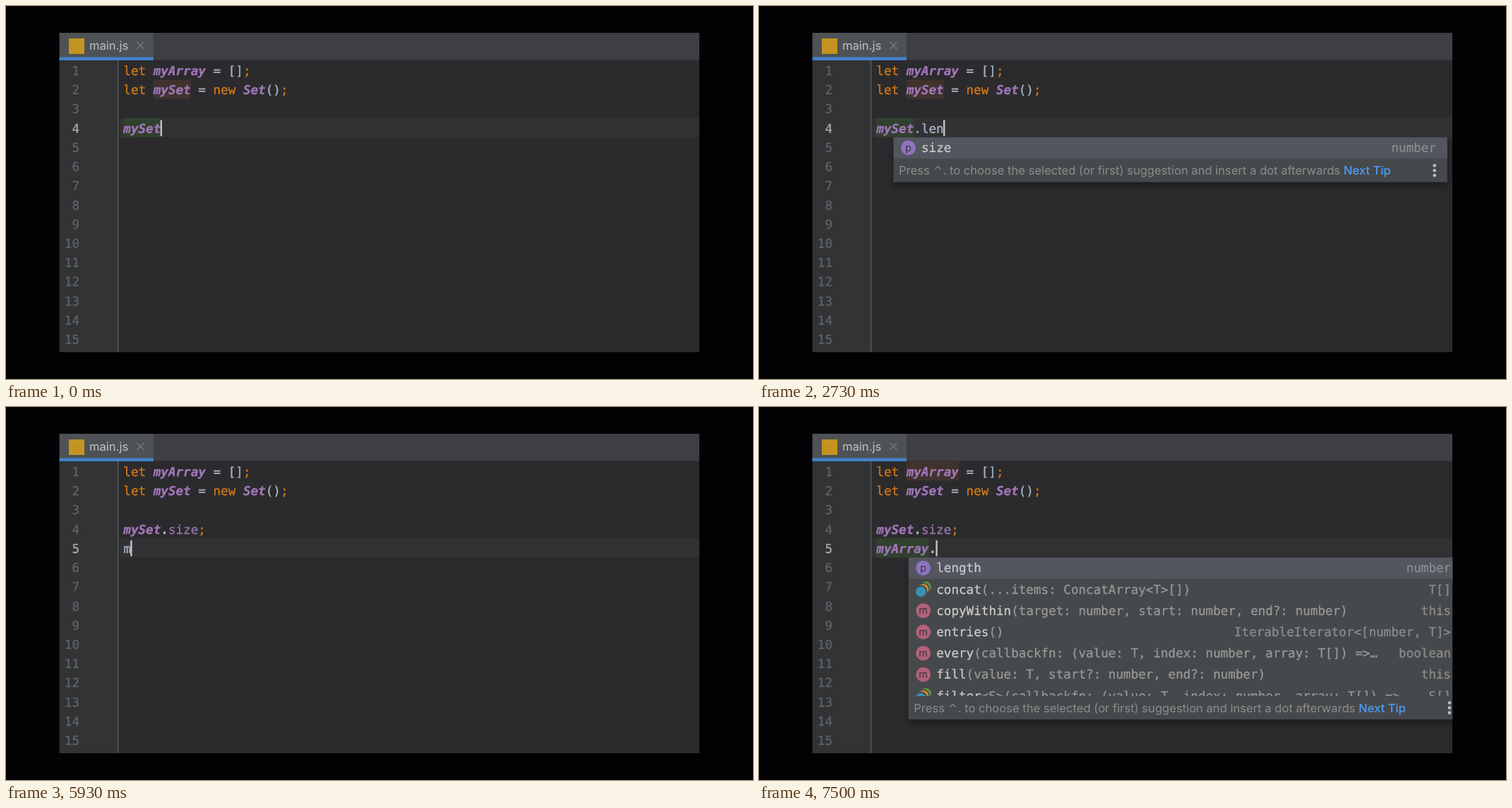
These frames come from a looping animation (1058x529 px, 8000 ms). An HTML page with a canvas:

```html
<!DOCTYPE html>
<html lang="en">
<head>
<meta charset="utf-8">
<title>Code completion</title>
<style>
  html, body { margin: 0; width: 100%; height: 100%; overflow: hidden; background: #020204; }
  canvas { display: block; width: 1058px; height: 529px; }
</style>
</head>
<body>
<canvas id="stage"></canvas>
<script>
const canvas = document.getElementById('stage');
const ctx = canvas.getContext('2d');
const LOOP = 8000;
const LEFT = 75.5, TOP = 38, WIDTH = 906.7, HEIGHT = 453;
const CODE_X = 166.3, CODE_TOP = 77.3, LINE = 27.22, ADVANCE = 10.6;
const ROW = 30.2, FOOTER = 33.4, POPUP_WIDTH = 784.3;
const MONO = '17.607px "DejaVu Sans Mono", monospace';
const UI = '16.6px Inter, sans-serif';

const COLORS = {
  keyword: '#d67a14', variable: '#a276ba', property: '#9d75b0', plain: '#a9b7c6', dot: '#a9b7c6',
  name: '#cacaca', details: '#989898', dim: '#8c8c8c', match: '#4c9dfa', read: '#32412f', write: '#40332d',
};
const STYLES = { variable: 'italic bold ', dot: 'bold ' };
const ICONS = {
  p: ['p', '#9073bf'], v: ['v', '#9073bf'], m: ['m', '#b4607a'], c: ['c', '#3a8fae'], inherited: ['m', '#909090'],
};

// Code lines as [style, text] tokens
const arrayLine = [['keyword', 'let '], ['variable', 'myArray'], ['plain', ' = []'], ['keyword', ';']];
const setLine = [['keyword', 'let '], ['variable', 'mySet'], ['plain', ' = '], ['keyword', 'new '],
  ['variable', 'Set'], ['plain', '()'], ['keyword', ';']];
const setRef = ['variable', 'mySet'], arrayRef = ['variable', 'myArray'];
const member = text => [setRef, ['plain', '.' + text]];
const sizeRef = [setRef, ['dot', '.'], ['property', 'size']];
const sizeLine = [...sizeRef, ['keyword', ';']];

// Suggestions as [icon, name, details, type]
const size = ['p', 'size', '', 'number'];
const clear = ['m', 'clear', '()', 'void'];
const remove = ['m', 'delete', '(value: T)', 'boolean'];
const enumerable = ['inherited', 'propertyIsEnumerable', '(v: PropertyKey) (Object, built-in)', 'boolean'];
const localeString = ['inherited', 'toLocaleString', '() (Object, built-in)', 'string'];
const letTemplate = ['', 'let', '', 'let name = expr'];
const setMembers = [
  size, ['m', 'add', '(value: T)', 'this'], clear, remove,
  ['m', 'entries', '()', 'IterableIterator<[T, T]>'],
  ['m', 'forEach', '(callbackfn: (value: T, value2: T, set: Set<T>) =>…', 'void'],
  ['m', 'has', '(value: T)', 'boolean'],
];
const arrayMembers = [
  ['p', 'length', '', 'number'],
  ['overload', 'concat', '(...items: ConcatArray<T>[])', 'T[]'],
  ['m', 'copyWithin', '(target: number, start: number, end?: number)', 'this'],
  ['m', 'entries', '()', 'IterableIterator<[number, T]>'],
  ['m', 'every', '(callbackfn: (value: T, index: number, array: T[]) =>…', 'boolean'],
  ['m', 'fill', '(value: T, start?: number, end?: number)', 'this'],
  ['overload', 'filter', '<S>(callbackfn: (value: T, index: number, array: T[]) =>…', 'S[]'],
];
const globals = [
  ['v', 'myArray', '', 'any[]'], ['v', 'mySet', '', 'Set<any>'],
  ...['MimeType', 'MimeTypeArray', 'MediaKeys', 'MediaKeySession', 'MediaKeyStatusMap']
    .map(name => ['c', name, ' (built-in)', '']),
];
const popup = (column, prefix, rows) => ({ column, prefix, rows });
const setMarks = [[2, 4, 5, 'write'], [4, 0, 5, 'read']];

// Each step changes part of the editor state
const steps = [
  [0, { line: 4, text: [setRef], marks: setMarks, popup: null, bulb: false }],
  [60, { text: member('') }],
  [130, { popup: popup(6, '', setMembers) }],
  [1400, { text: member('l') }],
  [1430, { popup: popup(6, 'l', [size, clear, remove, ['m', 'values', '()', 'IterableIterator<T>'],
    enumerable, localeString, letTemplate]) }],
  [1530, { text: member('le'), popup: popup(6, 'le', [size, clear, remove, enumerable, localeString, letTemplate]) }],
  [2730, { text: member('len'), popup: popup(6, 'len', [size]) }],
  [2860, { text: member('leng'), popup: popup(6, 'leng', [size]) }],
  [3430, { popup: null }],
  [3460, { text: sizeRef }],
  [3730, { marks: [[4, 6, 4, 'read']] }],
  [4260, { bulb: true }],
  [4930, { text: sizeLine, bulb: false }],
  [4960, { marks: [] }],
  [5230, { line: 5, text: [] }],
  [5930, { text: [['plain', 'm']] }],
  [6000, { popup: popup(0, 'm', globals) }],
  [6030, { text: [['plain', 'my']] }],
  [6100, { popup: popup(0, 'my', globals) }],
  [6730, { popup: null }],
  [6760, { text: [arrayRef] }],
  [7030, { marks: [[1, 4, 7, 'write'], [5, 0, 7, 'read']] }],
  [7430, { text: [arrayRef, ['dot', '.']] }],
  [7500, { popup: popup(8, '', arrayMembers) }],
];

function rect(x, y, width, height, color) {
  ctx.fillStyle = color;
  ctx.fillRect(x, y, width, height);
}

function disc(x, y, radius, color) {
  ctx.fillStyle = color;
  ctx.beginPath();
  ctx.arc(x, y, radius, 0, 2 * Math.PI);
  ctx.fill();
}

function strokeLine(x1, y1, x2, y2, color, width) {
  ctx.strokeStyle = color;
  ctx.lineWidth = width;
  ctx.beginPath();
  ctx.moveTo(x1, y1);
  ctx.lineTo(x2, y2);
  ctx.stroke();
}

function label(text, x, y, color, font = UI, align = 'left') {
  ctx.font = font;
  ctx.textAlign = align;
  ctx.fillStyle = color;
  ctx.fillText(text, x, y);
}

// Monospaced text with a hairline outline for a slightly heavier weight
function code(text, x, y, color, style = '', align = 'left') {
  label(text, x, y, color, style + MONO, align);
  ctx.strokeStyle = color;
  ctx.lineWidth = 0.3;
  ctx.strokeText(text, x, y);
}

const lineTop = line => CODE_TOP + (line - 1) * LINE;

function drawCode(line, tokens) {
  let column = 0;
  for (const [style, text] of tokens) {
    code(text, CODE_X + column * ADVANCE, lineTop(line) + 20.7, COLORS[style], STYLES[style]);
    column += text.length;
  }
  return column;
}

function drawTab() {
  rect(LEFT, TOP, WIDTH, 39, '#3e3e43');
  rect(LEFT, 76, WIDTH, 1, '#353538');
  rect(LEFT, TOP, 133.3, 39, '#4e5254');
  rect(LEFT, 72.5, 133.3, 4.5, '#4283cc');
  rect(89, 46, 22, 22, '#c49421');
  label('main.js', 118, 62, '#c0c2c4');
  strokeLine(185.3, 51, 195.3, 61, '#777b7d', 1.2);
  strokeLine(195.3, 51, 185.3, 61, '#777b7d', 1.2);
}

function drawBulb() {
  disc(187.5, 144, 7.8, '#f4a90c');
  rect(184, 149, 7, 3.5, '#f4a90c');
  rect(183.2, 153, 8.6, 1.4, '#b8bcc0');
  rect(184.2, 155.7, 6.6, 1.3, '#b8bcc0');
}

function drawEditor(state) {
  rect(LEFT, 77, WIDTH, 414, '#2b2b2d');
  rect(LEFT, 77, 82.5, 414, '#313335');
  rect(160, lineTop(state.line), 822, LINE, '#323234');
  rect(158, 77, 1.2, 414, '#606060');
  for (let line = 1; line <= 15; line++) {
    code(line, 104, lineTop(line) + 20.7, line === state.line ? '#a9a9a9' : '#606366', '', 'right');
  }
  for (const [line, column, length, kind] of state.marks) {
    rect(CODE_X + column * ADVANCE, lineTop(line), length * ADVANCE, LINE, COLORS[kind]);
  }
  drawCode(1, arrayLine);
  drawCode(2, setLine);
  if (state.line === 5) drawCode(4, sizeLine);
  const column = drawCode(state.line, state.text);
  rect(CODE_X + column * ADVANCE - 0.7, lineTop(state.line) + 3, 2.4, 22.5, '#c4c4c4');
  if (state.bulb) drawBulb();
}

// Indices of the letters that match what was typed
function matchedLetters(name, prefix) {
  const lower = name.toLowerCase(), start = lower.indexOf(prefix);
  if (start >= 0) return [...prefix].map((_, i) => start + i);
  const found = [];
  for (const letter of prefix) {
    const index = lower.indexOf(letter, found.length ? found[found.length - 1] + 1 : 0);
    if (index < 0) return [];
    found.push(index);
  }
  return found;
}

function drawIcon(kind, x, y) {
  if (kind === 'overload') {
    disc(x + 3.5, y - 3.5, 7.5, '#5a9a3c');
    disc(x + 0.3, y - 0.8, 8.6, '#46494b');
    disc(x, y - 0.2, 7.5, '#d3902f');
    disc(x - 3, y + 2.6, 8.6, '#46494b');
    disc(x - 3.5, y + 3.3, 7.2, '#3a91b4');
  } else if (kind) {
    const [letter, color] = ICONS[kind];
    disc(x, y, 10.4, color);
    label(letter, x, y + 4.6, '#35363a', '14.5px Inter, sans-serif', 'center');
  }
}

function drawRow([icon, name, details, type], prefix, left, top) {
  const x = left + 39.5, baseline = top + 20.9;
  const matches = icon ? matchedLetters(name, prefix) : [];
  const base = icon === 'inherited' ? 'dim' : 'name';
  drawIcon(icon, left + 21, top + 15);
  [...name].forEach((letter, i) =>
    code(letter, x + i * ADVANCE, baseline, COLORS[matches.includes(i) ? 'match' : base]));
  code(details, x + name.length * ADVANCE, baseline, icon === 'inherited' ? COLORS.dim : COLORS.details);
  code(type, left + POPUP_WIDTH - 15.8, baseline, COLORS.dim, '', 'right');
}

function drawFooter(left, bottom) {
  const baseline = bottom - 10.5;
  label('Press', left + 7.5, baseline, COLORS.dim);
  label('^', left + 56, baseline, COLORS.dim, '16px "DejaVu Sans", sans-serif');
  label('. to choose the selected (or first) suggestion and insert a dot afterwards',
    left + 70, baseline, COLORS.dim);
  label('Next Tip', left + 637.5, baseline, COLORS.match, '500 ' + UI);
  for (const offset of [-7, 0, 7]) disc(left + 766.3, bottom - 16.5 + offset, 2.3, '#bcbec0');
}

function drawPopup({ column, prefix, rows }, line, age) {
  const left = CODE_X + column * ADVANCE - 39.4, top = lineTop(line + 1);
  const listHeight = Math.min(rows.length, 6.5) * ROW, bottom = top + listHeight + FOOTER;

  ctx.save();
  ctx.shadowColor = 'rgba(0,0,0,.35)';
  ctx.shadowBlur = 10 * scale;
  ctx.shadowOffsetY = 5 * scale;
  rect(left, top, POPUP_WIDTH, bottom - top, '#46494b');
  ctx.restore();

  ctx.save();
  ctx.beginPath();
  ctx.rect(left, top, POPUP_WIDTH, listHeight);
  ctx.clip();
  rect(left, top, POPUP_WIDTH, ROW, '#53565f');
  rows.forEach((row, i) => drawRow(row, prefix, left, top + i * ROW));
  if (rows.length > 6) {
    ctx.globalAlpha = Math.max(0, Math.min(1, (1100 - age) / 130));
    ctx.beginPath();
    ctx.roundRect(left + 770, top + 2, 11, 38, 5.5);
    ctx.fillStyle = 'rgba(166,166,166,.4)';
    ctx.fill();
  }
  ctx.restore();
  drawFooter(left, bottom);
}

function draw(time) {
  const state = {};
  let popupStart = 0;
  for (const [at, change] of steps) {
    if (at > time) break;
    Object.assign(state, change);
    if (change.popup) popupStart = at;
  }
  ctx.setTransform(scale, 0, 0, scale, 0, 0);
  rect(0, 0, 1058, 529, '#020204');
  ctx.save();
  ctx.beginPath();
  ctx.rect(LEFT, TOP, WIDTH, HEIGHT);
  ctx.clip();
  drawEditor(state);
  drawTab();
  if (state.popup) drawPopup(state.popup, state.line, time - popupStart);
  ctx.restore();
}

const scale = window.devicePixelRatio || 1;
canvas.width = 1058 * scale;
canvas.height = 529 * scale;
ctx.textRendering = 'geometricPrecision';
ctx.lineJoin = 'round';

const start = performance.now();
function tick() {
  draw((performance.now() - start) % LOOP);
  requestAnimationFrame(tick);
}
tick();
</script>
</body>
</html>
```
